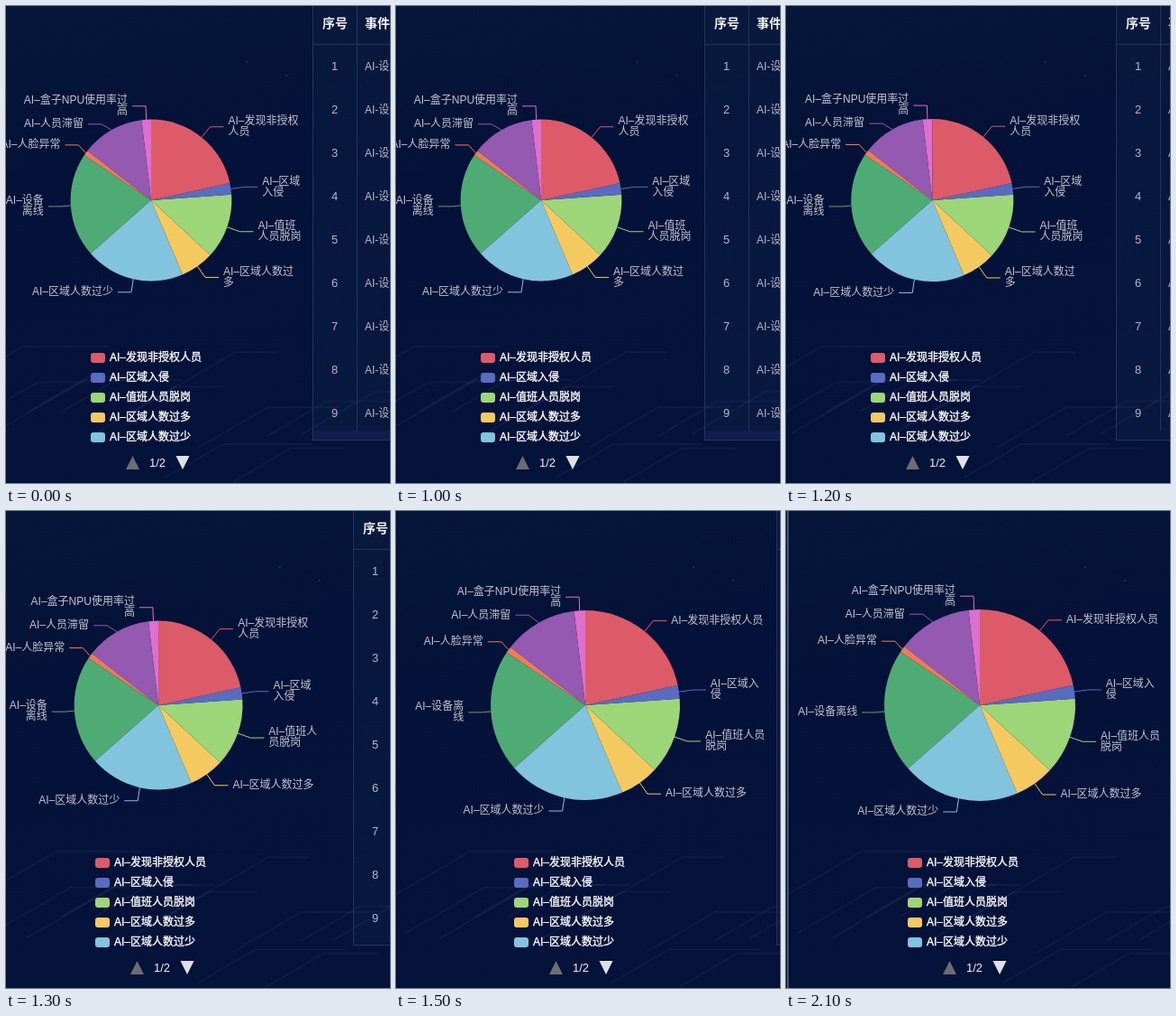
An HTML page with a canvas that plays this animation: 426x528 px, repeating every 2.2 s.

```html
<!DOCTYPE html>
<html lang="zh">
<head>
<meta charset="utf-8">
<style>
html, body { margin: 0; width: 100%; height: 100%; overflow: hidden; background: #041138; }
canvas { display: block; width: 426px; height: 528px; }
</style>
</head>
<body>
<canvas id="stage" width="426" height="528"></canvas>
<script>
const ctx = document.getElementById('stage').getContext('2d');
const W = 426, H = 528, LOOP = 2200, STEP = 100, PAUSE = 1500, CY = 215;
const FAMILY = '"Liberation Sans", "Noto Sans CJK SC", "Noto Sans CJK", sans-serif';

const SLICES = [
  { name: '发现非授权人员', color: '#dd5b68', share: 21.6 },
  { name: '区域入侵', color: '#596cbf', share: 2.3 },
  { name: '值班人员脱岗', color: '#9cd679', share: 13 },
  { name: '区域人数过多', color: '#f4ca60', share: 6.7 },
  { name: '区域人数过少', color: '#82c4dd', share: 19.9 },
  { name: '设备离线', color: '#4fab74', share: 20.9 },
  { name: '人脸异常', color: '#ec7b5c', share: 1.1 },
  { name: '人员滞留', color: '#9459b0', share: 12.6 },
  { name: '盒子NPU使用率过高', color: '#de6fcf', share: 1.9 }
];

const progress = (t, start, span) => Math.min(1, Math.max(0, (t - start) / span));
const ease = (t, start, span) => (1 - Math.cos(Math.PI * progress(t, start, span))) / 2;

function setFont(size, weight = 400) {
  ctx.font = `${weight} ${size}px ${FAMILY}`;
}

function text(str, x, y, color, size = 12, align = 'left', weight = 400) {
  setFont(size, weight);
  ctx.textAlign = align;
  ctx.textBaseline = 'middle';
  ctx.fillStyle = color;
  ctx.fillText(str, x, y);
}

function path(points, color, width = 1) {
  ctx.beginPath();
  for (let i = 0; i < points.length; i += 2) ctx.lineTo(points[i], points[i + 1]);
  ctx.strokeStyle = color;
  ctx.lineWidth = width;
  ctx.stroke();
}

function triangle(x, y, dir, color) {
  ctx.beginPath();
  ctx.moveTo(x - 7.5, y + 7.5 * dir);
  ctx.lineTo(x + 7.5, y + 7.5 * dir);
  ctx.lineTo(x, y - 7.5 * dir);
  ctx.fillStyle = color;
  ctx.fill();
}

function seeded(seed) {
  return () => (seed = seed * 16807 % 2147483647) / 2147483647;
}

function backdrop(shift) {
  const base = ctx.createLinearGradient(0, 0, 120, H);
  base.addColorStop(0, '#06163a');
  base.addColorStop(0.4, '#041138');
  base.addColorStop(1, '#05123a');
  ctx.fillStyle = base;
  ctx.fillRect(0, 0, W, H);

  ctx.save();
  ctx.translate(shift, 0);
  ctx.lineJoin = 'round';
  const rand = seeded(29);
  // circuit traces: a diagonal rise that levels out
  for (let i = 0; i < 12; i++) {
    const x = -90 + i * 38, y = 440 + rand() * 90;
    const run = 60 + rand() * 60, top = y - run * 0.58;
    path([x, y, x + run, top, x + run + 40 + rand() * 60, top], 'rgba(120,145,190,0.08)', 2);
  }
  ctx.fillStyle = 'rgba(140,160,200,0.2)';
  for (const [x, y] of [[267, 62], [311, 77]]) ctx.fillRect(x - 1, y - 1, 2, 2);
  ctx.restore();
}

function table(x) {
  const line = '#25335a';
  ctx.fillStyle = 'rgba(30,50,85,0.18)';
  ctx.fillRect(x, 0, W - x, 480);
  if (x < 360) {
    ctx.fillStyle = '#111d4c';
    ctx.fillRect(x, 470, W - x, 10);
  }
  path([x + 0.5, 0, x + 0.5, 480], line);
  path([x + 49.5, 0, x + 49.5, 470], line);
  path([x, 42.5, W, 42.5], line);
  path([x, 480.5, W, 480.5], line);
  text('序号', x + 25, 20.5, '#f2f4f8', 14, 'center', 700);
  text('事件', x + 58, 20.5, '#f2f4f8', 14, 'left', 700);
  for (let i = 0; i < 9; i++) {
    const y = 67.5 + 48 * i;
    text(i + 1, x + 24.5, y, '#b3b8c6', 13, 'center');
    text('AI-设备离线', x + 58, y, '#b3b8c6');
  }
}

function wrap(str, room) {
  setFont(12);
  let cut = str.length;
  while (cut > 4 && ctx.measureText(str.slice(0, cut)).width > room) cut--;
  return [str.slice(0, cut), str.slice(cut)].filter(Boolean);
}

function pie(cx, r) {
  const reach = r + 15, half = 2 * r - 10;
  let end = Math.PI * 2, minY = 0;
  // backwards, so that left labels are stacked from the top down
  for (const { name, color, share } of [...SLICES].reverse()) {
    const start = end - share / 100 * Math.PI * 2, mid = (start + end) / 2;
    ctx.beginPath();
    ctx.moveTo(cx, CY);
    ctx.arc(cx, CY, r, start - Math.PI / 2, end - Math.PI / 2);
    ctx.closePath();
    ctx.fillStyle = color;
    ctx.fill();

    const sin = Math.sin(mid), cos = Math.cos(mid), side = Math.sign(sin);
    let x = cx + reach * sin + 20 * side;
    let y = CY - reach * cos;
    if (side < 0) {
      x -= 5 * sin;
      if (y < minY) {
        y = minY;
        x -= 6;
      }
      minY = y + 20;
    }
    path([cx + r * sin, CY - r * cos, x - 20 * side, y, x - 5 * side, y], color);

    const rows = wrap('AI–' + name, Math.min(120, half - (x - cx) * side));
    const align = side > 0 ? 'left' : 'right';
    rows.forEach((row, i) => text(row, x, y + (i - (rows.length - 1) / 2) * 12, '#c0c4ce', 12, align));
    end = start;
  }
}

function legend(x) {
  SLICES.slice(0, 5).forEach(({ name, color }, i) => {
    const y = 389.5 + 22 * i;
    ctx.beginPath();
    ctx.roundRect(x, y - 5.5, 16, 11, 3);
    ctx.fillStyle = color;
    ctx.fill();
    text('AI–' + name, x + 21, y, '#fff');
    // a hairline outline gives the medium weight
    ctx.strokeStyle = '#fff';
    ctx.lineWidth = 0.35;
    ctx.strokeText('AI–' + name, x + 21, y);
  });
  triangle(x + 46.5, 505.5, 1, '#6c6e70');
  text('1/2', x + 74, 506, '#eef0f4', 13, 'center');
  triangle(x + 102, 505.5, -1, '#dfe1e8');
}

function draw(now) {
  const time = Math.floor(now % LOOP / STEP) * STEP;
  // the panel widens until the pause, then everything settles a little further
  const t = Math.min(time, PAUSE);
  const settle = progress(time, 1600, 400);
  const cx = 161 + 49 * progress(t, 1100, 400) ** 2.6 + 5 * settle;
  const r = Math.min(cx / 2 + 8.9, 105 + settle);
  const border = 4 * settle - 2;

  backdrop(67 * ease(t, 960, 640) + 2 * settle);
  table(Math.round(340 + 96 * ease(t, 940, 750) + 6 * settle));
  pie(cx, r);
  legend(Math.round(cx - 0.755 * r));
  path([border, 0, border, H], '#46557a', 2);
}

const begin = performance.now();
function tick() {
  draw(performance.now() - begin);
  requestAnimationFrame(tick);
}
tick();
</script>
</body>
</html>
```
